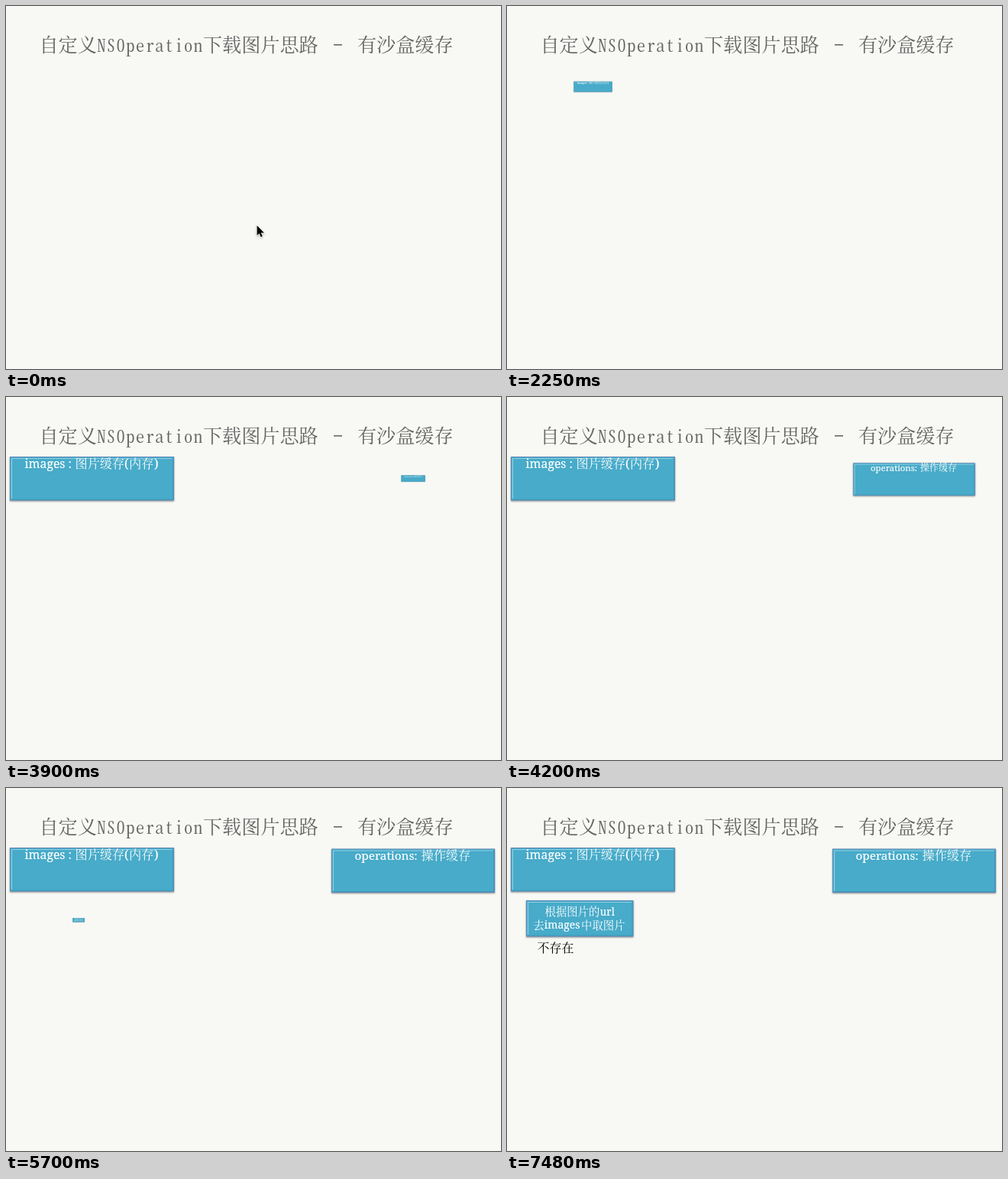
An HTML page for the animation above (8 s loop, 648 by 475 pixels).

```html
<!DOCTYPE html>
<html lang="zh-CN">
<head>
<meta charset="utf-8">
<title>下载图片思路</title>
<style>
  html, body { margin: 0; width: 100%; height: 100%; overflow: hidden; background: #f8f9f4; }
  svg { display: block; width: 648px; height: 475px; }
  text { font-family: "Noto Serif CJK SC", "Noto Sans CJK SC", "Noto Sans CJK", serif; font-weight: 300; white-space: pre; }
  .title { fill: #646464; font-size: 25.1px; }
  .cells { font-size: 22.5px; text-anchor: middle; font-feature-settings: "hwid"; }
  .slab { font-family: "Noto Serif", serif; font-weight: 500; stroke: #fff; stroke-width: .2px; }
  .box text { fill: #fff; }
  .face { fill: #47abc9; stroke: #5a8bbb; filter: drop-shadow(0 1px 1.3px rgba(0, 0, 0, .45)); }
  .shine { fill: none; stroke: #a5daea; stroke-width: 1.2px; opacity: .75; }
  .edge { fill: none; stroke: #3b94b4; opacity: .7; }
</style>
</head>
<body>
<svg id="stage" viewBox="0 0 648 475" xmlns="http://www.w3.org/2000/svg">
  <defs>
    <linearGradient id="fade" gradientUnits="userSpaceOnUse" x1="53" y1="0" x2="62" y2="0">
      <stop offset="0" stop-color="#fff"/>
      <stop offset="1" stop-color="#fff" stop-opacity="0"/>
    </linearGradient>
    <mask id="wipe" maskUnits="userSpaceOnUse" x="30" y="190" width="70" height="40">
      <rect id="reveal" x="-60" y="190" width="200" height="40" fill="url(#fade)"/>
    </mask>
  </defs>
  <g class="title">
    <text x="43.5" y="60">自定义</text>
    <text id="className" y="59.5" class="cells">NSOperation</text>
    <text x="258" y="60">下载图片思路</text>
    <path d="M429 50.8h11" stroke="#6c6c6c" stroke-width="1.7"/>
    <text x="460" y="60">有沙盒缓存</text>
  </g>
  <g id="boxes"></g>
  <g mask="url(#wipe)"><text x="39.5" y="214.5" font-size="16">不存在</text></g>
  <path id="cursor" d="M0 0V13L3 10.3 5 15 7.2 14 5.2 9.5H9.3Z" stroke="#fff" stroke-width="1.4"
    paint-order="stroke" style="filter:drop-shadow(0 1px 1px rgba(0,0,0,.3))"/>
</svg>
<script>
const LOOP = 8000;
const $ = id => document.getElementById(id);

// The class name is set in half-width cells, like the ideographs around it.
const CELL = 12.65;
$('className').setAttribute('x',
  [...$('className').textContent].map((_, i) => 118.5 + CELL * (i + .5)).join(' '));

// Text runs: [x, baseline, size, content, slab?]
const boxes = [
  { x: 5.5, y: 78.5, w: 214, h: 56.5, cx: 112.5, cy: 105.2,
    steps: [[0, 0], [2250, .235], [2400, .533], [2550, .833], [2700, 1]],
    runs: [[24.5, 93, 15.8, 'images :', 1], [90.5, 93.3, 16.2, '图片缓存'],
           [155, 93, 16, '(', 1], [161, 93.3, 16.2, '内存'], [194, 93, 16, ')', 1]] },
  { x: 426.5, y: 80, w: 213, h: 56.5, cx: 533, cy: 106.4,
    steps: [[0, 0], [3900, .147], [4050, .445], [4200, .745], [4350, 1]],
    runs: [[456.5, 94, 15.3, 'operations:', 1], [543.5, 94.3, 16.2, '操作缓存']] },
  { x: 25.5, y: 147.5, w: 139.5, h: 46.5, cx: 95, cy: 173,
    steps: [[0, 0], [5700, .112], [5840, .41], [5990, .71], [6130, 1]],
    runs: [[49.5, 167, 14.4, '根据图片的'], [121.8, 166.7, 13.5, 'url', 1],
           [34.5, 184.7, 14.4, '去'], [48.7, 184.4, 14, 'images', 1], [97, 184.7, 14.4, '中取图片']] }
];

const run = ([x, y, size, content, slab]) =>
  `<text x="${x}" y="${y}" font-size="${size}"${slab ? ' class="slab"' : ''}>${content}</text>`;

$('boxes').innerHTML = boxes.map(({ x, y, w, h, runs }) => `<g class="box">
  <rect class="face" x="${x}" y="${y}" width="${w}" height="${h}"/>
  <path class="shine" d="M${x + 2} ${y + h - 2}V${y + 2}H${x + w - 2}"/>
  <path class="edge" d="M${x + 2} ${y + h - 1}H${x + w - 1}V${y + 2}"/>
  ${runs.map(run).join('')}</g>`).join('');
const groups = [...$('boxes').children];

const cursorSteps = [[0, [328.6, 287.2]], [450, [358.6, 414.2]], [600, null]];
const wipeSteps = [[0, -80], [7180, 0], [7330, 24], [7480, 50]];

const valueAt = (steps, t) => steps.filter(([start]) => start <= t).pop()[1];

function place(el, visible, transform) {
  el.setAttribute('visibility', visible ? 'visible' : 'hidden');
  if (visible) el.setAttribute('transform', transform);
}

function draw(t) {
  boxes.forEach(({ cx, cy, steps }, i) => {
    const s = valueAt(steps, t);
    place(groups[i], s > 0, `translate(${cx} ${cy}) scale(${s}) translate(${-cx} ${-cy})`);
  });
  const tip = valueAt(cursorSteps, t);
  place($('cursor'), tip, `translate(${tip})`);
  $('reveal').setAttribute('transform', `translate(${valueAt(wipeSteps, t)} 0)`);
}

const begin = performance.now();
function tick() {
  draw((performance.now() - begin) % LOOP);
  requestAnimationFrame(tick);
}
tick();
</script>
</body>
</html>
```
